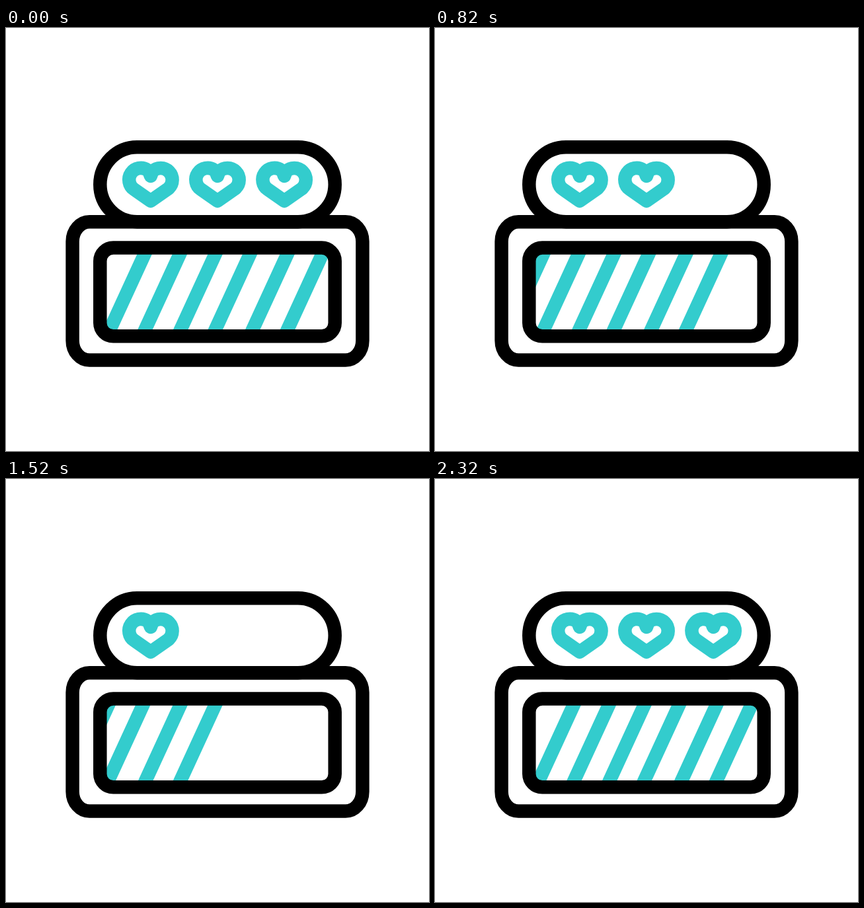
Animation, 640 px wide and 640 px high, one loop 2720 ms. Source, as an HTML page with a canvas:

```html
<!DOCTYPE html>
<html lang="en">
<head>
<meta charset="utf-8">
<title>Arcade lives</title>
<style>
  html, body { margin: 0; width: 100%; height: 100%; overflow: hidden; background: #fff; }
  canvas { display: block; width: 640px; height: 640px; }
</style>
</head>
<body>
<canvas id="stage" width="640" height="640"></canvas>
<script>
const ctx = document.getElementById("stage").getContext("2d");
const LOOP = 2720, STEP = 20;
const START = 20, END = 1540, BACK = 1940, REWIND = 4;
const TEAL = "#33cccd";
const STRIPES = [198, 251.3, 305, 357.5, 414, 466.8];

const clamp = v => Math.min(1, Math.max(0, v));
const part = (t, a, b) => clamp((t - a) / (b - a));
const smooth = p => p * p * (3 - 2 * p);
const easeOut = p => 1 - (1 - p) ** 3;

// The way back replays the way out, four times as fast.
function clock(t) {
  if (t < BACK) return Math.min(t, END);
  return Math.max(START, END - (t - BACK) * REWIND);
}

function drift(u) {
  return 26 * smooth(part(u, START, 580))
    + 48.5 * smooth(part(u, 600, 1100))
    + 87.5 * easeOut(part(u, 1100, END));
}

function box(x0, y0, x1, y1, rx, ry) {
  ctx.beginPath();
  ctx.roundRect(x0, y0, x1 - x0, y1 - y0, { x: rx, y: ry });
}

function heart(cx, alpha) {
  if (alpha <= 0) return;
  const y = 229.6, r = 17.7, low = 2.175, high = 0.8;
  ctx.globalAlpha = alpha;
  ctx.strokeStyle = TEAL;
  ctx.beginPath();
  ctx.arc(cx - 15, y, r, low, 2 * Math.PI - high);
  ctx.lineTo(cx, 224);
  ctx.arc(cx + 15, y, r, Math.PI + high, 3 * Math.PI - low);
  ctx.lineTo(cx, 261.6);
  ctx.closePath();
  ctx.stroke();
  ctx.globalAlpha = 1;
}

function stripes(shift) {
  const top = 338, bottom = 461, slope = 0.46;
  const at = (x, y) => x - shift - (y - 343) * slope;
  ctx.save();
  box(148, top, 492, bottom, 14, 14);
  ctx.clip();
  ctx.fillStyle = TEAL;
  for (const x of STRIPES) {
    ctx.beginPath();
    ctx.moveTo(at(x, top), top);
    ctx.lineTo(at(x + 22.6, top), top);
    ctx.lineTo(at(x + 22.6, bottom), bottom);
    ctx.lineTo(at(x, bottom), bottom);
    ctx.fill();
  }
  ctx.restore();
}

function draw(time) {
  const t = Math.floor((time % LOOP) / STEP) * STEP;
  const u = clock(t);
  ctx.fillStyle = "#fff";
  ctx.fillRect(0, 0, 640, 640);
  ctx.lineWidth = 20.5;
  ctx.lineJoin = "round";

  stripes(drift(u));
  heart(218.9, 1);
  heart(320, 1 - part(u, 1300, 1440));
  heart(421.1, 1 - part(u, 500, 660));

  ctx.strokeStyle = "#000";
  box(142.3, 180.2, 497.7, 293.2, 56, 56.5);
  ctx.stroke();
  box(100.6, 293.3, 539.4, 502.6, 25.7, 29.7);
  ctx.stroke();
  box(142.3, 332.6, 497.7, 466.3, 20, 20);
  ctx.stroke();
}

const begin = performance.now();
function tick() {
  draw(performance.now() - begin);
  requestAnimationFrame(tick);
}
tick();
</script>
</body>
</html>
```
